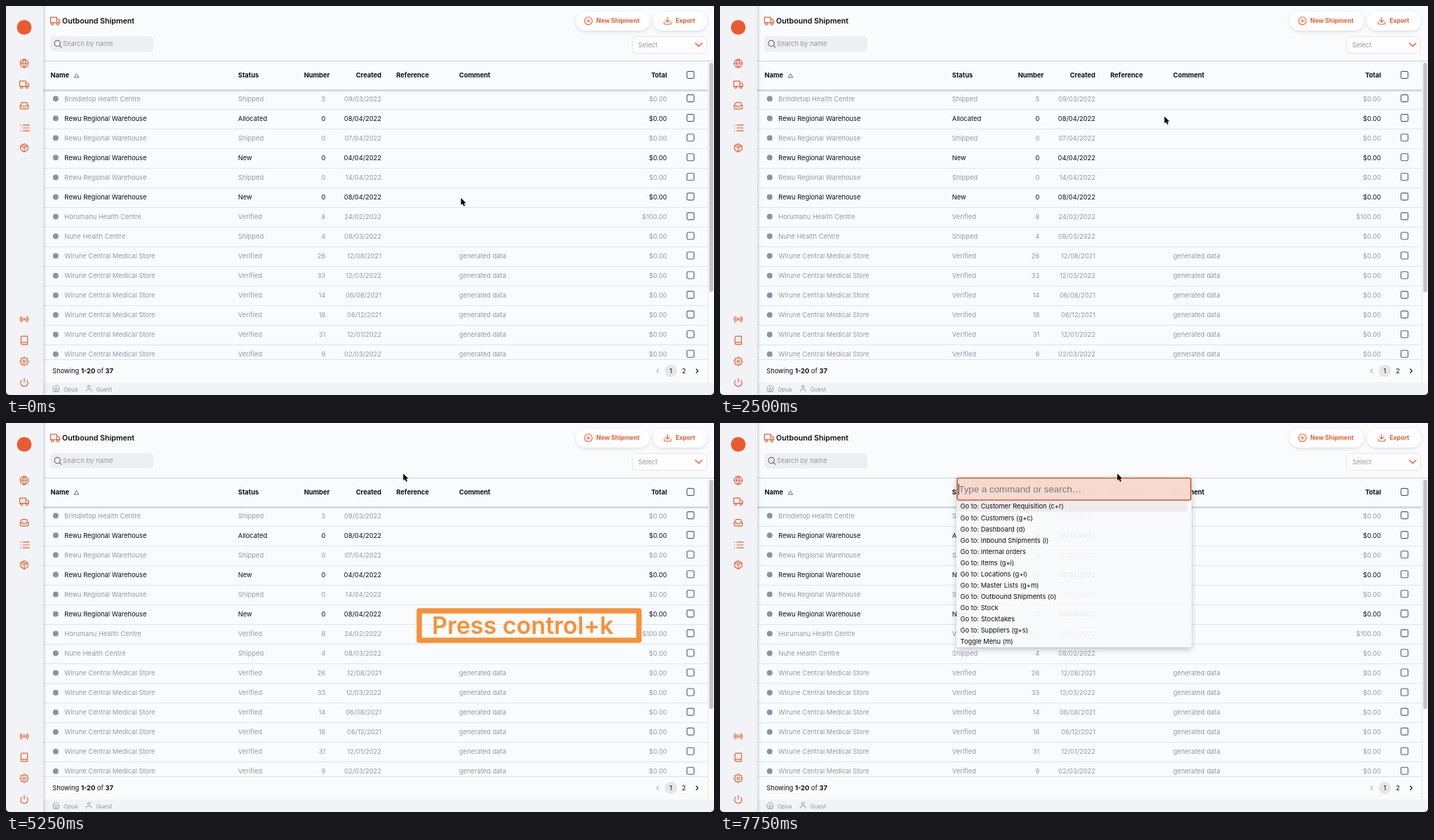
Recreate the animation shown at these times as an HTML page. Size 1009 by 555 pixels, loop 8 s.

```html
<!DOCTYPE html>
<html lang="en">
<head>
<meta charset="utf-8">
<title>Outbound Shipment</title>
<style>
html, body { margin: 0; width: 100%; height: 100%; overflow: hidden; background: #fafbfd; }
svg { display: block; width: 100%; height: 100%; }
text { font-family: Inter, sans-serif; font-size: 9.33px; fill: #0d0d14; white-space: pre; }
.muted { fill: #9696a1; }
.bold { font-weight: 700; }
.title { font-size: 10.67px; font-weight: 600; }
.btn { font-size: 8.67px; font-weight: 700; fill: #e95c30; }
.small { font-size: 8px; fill: #8f90a6; }
.ask { font-family: "Liberation Sans", Arial, sans-serif; font-size: 13.33px; fill: #85736f; }
.note { font-size: 34px; font-weight: 600; fill: #f79138; }
.icon { fill: none; stroke-linecap: round; stroke-linejoin: round; }
</style>
</head>
<body>
<svg id="stage" viewBox="0 0 1009 555" preserveAspectRatio="none">
  <defs>
    <filter id="soft" x="-20%" y="-40%" width="140%" height="200%">
      <feDropShadow dx="0" dy="1.5" stdDeviation="2.2" flood-color="#555770" flood-opacity=".2"/>
    </filter>
    <filter id="deep" x="-10%" y="-10%" width="120%" height="125%">
      <feDropShadow dx="0" dy="3" stdDeviation="4" flood-color="#000" flood-opacity=".25"/>
    </filter>
    <linearGradient id="right"><stop stop-color="#555770" stop-opacity=".2"/><stop offset="1" stop-color="#555770" stop-opacity="0"/></linearGradient>
    <linearGradient id="down" x2="0" y2="1"><stop stop-color="#555770" stop-opacity=".28"/><stop offset="1" stop-color="#555770" stop-opacity="0"/></linearGradient>
    <clipPath id="body"><rect x="53" y="119" width="947" height="385"/></clipPath>
  </defs>
</svg>
<script>
const NS = 'http://www.w3.org/2000/svg';
const stage = document.getElementById('stage');
const ORANGE = '#e95c30', GREY = '#8f90a6';

function add(parent, tag, attrs, content) {
  const el = document.createElementNS(NS, tag);
  for (const key in attrs) el.setAttribute(key, attrs[key]);
  if (content !== undefined) el.textContent = content;
  parent.appendChild(el);
  return el;
}
const group = (parent, attrs = {}) => add(parent, 'g', attrs);
const rect = (parent, x, y, width, height, fill, more) =>
  add(parent, 'rect', { x, y, width, height, fill, ...more });
const line = (parent, d, stroke, width = 1, more) =>
  add(parent, 'path', { d, stroke, 'stroke-width': width, class: 'icon', ...more });

// Text is placed by the middle of its capitals.
function label(parent, str, x, mid, cls = '', anchor = 'start', size = 9.33) {
  return add(parent, 'text', { x, y: mid + size * 0.364, class: cls, 'text-anchor': anchor }, str);
}

const ring = (x, y, r) => `M${x - r} ${y}a${r} ${r} 0 1 0 ${2 * r} 0a${r} ${r} 0 1 0 ${-2 * r} 0`;
function gear() {
  let d = '';
  for (let i = 0; i < 96; i++) {
    const a = i / 96 * 2 * Math.PI, r = 9.1 + 1.4 * Math.cos(8 * a);
    d += (i ? 'L' : 'M') + (12 + r * Math.cos(a)).toFixed(2) + ' ' + (12 + r * Math.sin(a)).toFixed(2);
  }
  return d + 'z';
}

const ICONS = {
  globe: ring(12, 12, 10) + 'M2 12h20M12 2a15.3 15.3 0 0 1 4 10 15.3 15.3 0 0 1-4 10 15.3 15.3 0 0 1-4-10 15.3 15.3 0 0 1 4-10z',
  truck: 'M1 3h15v13H1zM16 8h4l3 3v5h-7z' + ring(5.5, 18.5, 2.5) + ring(18.5, 18.5, 2.5),
  inbox: 'M22 12h-6l-2 3h-4l-2-3H2M5.45 5.1L2 12v6a2 2 0 0 0 2 2h16a2 2 0 0 0 2-2v-6l-3.45-6.9A2 2 0 0 0 16.8 4H7.2a2 2 0 0 0-1.75 1.1z',
  list: 'M7 5h16M7 12h16M7 19h16M1 5h.6M1 12h.6M1 19h.6',
  box: 'M16.5 9.4l-9-5.2M21 16V8a2 2 0 0 0-1-1.7l-7-4a2 2 0 0 0-2 0l-7 4A2 2 0 0 0 3 8v8a2 2 0 0 0 1 1.7l7 4a2 2 0 0 0 2 0l7-4a2 2 0 0 0 1-1.7zM3.3 7L12 12l8.7-5M12 22V12',
  radio: ring(12, 12, 2) + 'M16.2 7.8a6 6 0 0 1 0 8.4M7.8 16.2a6 6 0 0 1 0-8.4M19 5a10 10 0 0 1 0 14M5 19a10 10 0 0 1 0-14',
  book: 'M4 19.5A2.5 2.5 0 0 1 6.5 17H20M6.5 2H20v20H6.5A2.5 2.5 0 0 1 4 19.5v-15A2.5 2.5 0 0 1 6.5 2z',
  gear: ring(12, 12, 3) + gear(),
  power: 'M18.4 6.6a9 9 0 1 1-12.8 0M12 2v10',
  plus: ring(12, 12, 10) + 'M12 8v8M8 12h8',
  down: 'M21 15v4a2 2 0 0 1-2 2H5a2 2 0 0 1-2-2v-4M7 10l5 5 5-5M12 15V3',
  home: 'M3 9l9-7 9 7v11a2 2 0 0 1-2 2H5a2 2 0 0 1-2-2zM9 22V12h6v10',
  user: 'M20 21v-2a4 4 0 0 0-4-4H8a4 4 0 0 0-4 4v2' + ring(12, 7, 4)
};
function icon(name, x, y, scale = 0.6, color = ORANGE) {
  line(stage, ICONS[name], color, 2, {
    transform: `translate(${x - 12 * scale} ${y - 12 * scale}) scale(${scale})`
  });
}

function checkbox(parent, y) {
  rect(parent, 970.5, y - 5, 10, 10, 'none', { rx: 1.6, stroke: '#5b5c69', 'stroke-width': 1.1 });
}

// Backgrounds
rect(stage, 0, 0, 1009, 555, '#fafbfd');
rect(stage, 53, 79, 947, 425, '#f8fcfe');
rect(stage, 53, 537, 956, 18, '#f2f3f6');
rect(stage, 53, 78, 956, 1, '#cfd1d5');

// Table rows
const rows = [
  ['Brindletop Health Centre', 'Shipped', 5, '09/03/2022'],
  ['Rewu Regional Warehouse', 'Allocated', 0, '08/04/2022'],
  ['Rewu Regional Warehouse', 'Shipped', 0, '07/04/2022'],
  ['Rewu Regional Warehouse', 'New', 0, '04/04/2022'],
  ['Rewu Regional Warehouse', 'Shipped', 0, '14/04/2022'],
  ['Rewu Regional Warehouse', 'New', 0, '08/04/2022'],
  ['Horumanu Health Centre', 'Verified', 8, '24/02/2022'],
  ['Nuhe Health Centre', 'Shipped', 4, '08/03/2022']
];
[[26, '12/08/2021'], [33, '12/03/2022'], [14, '06/08/2021'], [18, '06/12/2021'], [31, '12/01/2022'], [9, '02/03/2022']]
  .forEach(([n, date]) => rows.push(['Wirune Central Medical Store', 'Verified', n, date, 'generated data']));

const table = group(stage, { 'clip-path': 'url(#body)' });
const hover = rect(table, 53, 259.5, 947, 28, '#f0f1f4');
rows.forEach(([name, status, number, date, comment], i) => {
  const y = 132.2 + i * 28.05;
  const cls = status === 'New' || status === 'Allocated' ? '' : 'muted';
  add(table, 'circle', { cx: 70.8, cy: y, r: 4, fill: GREY });
  label(table, name, 83.3, y, cls);
  label(table, status, 330.8, y, cls);
  label(table, number, 455.3, y, cls, 'end');
  label(table, date, 535, y, cls, 'end');
  if (comment) label(table, comment, 645.8, y, cls);
  label(table, i === 6 ? '$100.00' : '$0.00', 942, y, cls, 'end');
  checkbox(table, y - 0.6);
  rect(table, 53, Math.round(y + 14.6), 947, 1, '#e0e4e8');
});

// Table header
rect(stage, 53, 119, 947, 1, '#d5d8dc');
rect(stage, 53, 120, 947, 3, 'url(#down)');
[['Name', 63.5], ['Status', 330.8], ['Number', 461.3, 'end'], ['Created', 535, 'end'],
 ['Reference', 556.3], ['Comment', 645.8], ['Total', 942, 'end']]
  .forEach(([str, x, anchor]) => label(stage, str, x, 99, 'bold', anchor));
line(stage, 'M97.3 101.6L100.4 96.6L103.5 101.6z', '#555770', 0.9);
checkbox(stage, 98.4);

// Scrollbar
rect(stage, 1000, 79, 9, 458, '#fafafb');
rect(stage, 1000, 79, 1, 458, '#e6e7ea');
rect(stage, 1002.3, 81, 5.6, 327, '#c2c3c6', { rx: 2.8 });

// Toolbar
icon('truck', 70, 21.5);
label(stage, 'Outbound Shipment', 80, 21.2, 'title', 'start', 10.67);
rect(stage, 63, 43, 147, 22, '#eeeff3', { rx: 5 });
line(stage, ring(73.2, 53.3, 4.2) + 'M76.3 56.4L79 59.2', '#686a7c', 1.2);
label(stage, 'Search by name', 81, 53.3, 'muted');
rect(stage, 812, 8, 105, 27, '#fff', { rx: 13.5, filter: 'url(#soft)' });
icon('plus', 830, 21.2, 0.54);
label(stage, 'New Shipment', 841.3, 21.3, 'btn', 'start', 8.67);
rect(stage, 922, 8, 77, 27, '#fff', { rx: 13.5, filter: 'url(#soft)' });
icon('down', 942.8, 21.2, 0.54);
label(stage, 'Export', 954.2, 21.3, 'btn', 'start', 8.67);
rect(stage, 892.5, 43.5, 106, 24, '#fdfdfe', { rx: 5, stroke: '#e2e4ea' });
label(stage, 'Select', 901, 55.6, 'muted');
line(stage, 'M982.5 53l4.7 4.5 4.7-4.5', ORANGE, 1.4);

// Pagination
rect(stage, 53, 504, 947, 1, '#dfe2e6');
const shown = label(stage, 'Showing ', 66.2, 520.5);
add(shown, 'tspan', { class: 'bold' }, '1-20');
add(shown, 'tspan', {}, ' of ');
add(shown, 'tspan', { class: 'bold' }, '37');
add(stage, 'circle', { cx: 947.5, cy: 520.5, r: 8.8, fill: '#e6e6e9' });
line(stage, 'M930 518l-2.5 2.6 2.5 2.6', '#a9aab5', 1.1);
line(stage, 'M983.8 518l2.5 2.6-2.5 2.6', '#1c1c28', 1.3);
label(stage, '1', 947.5, 520.6, '', 'middle');
label(stage, '2', 966, 520.6, '', 'middle');

// Bottom bar
icon('home', 71.5, 545.5, 0.46, GREY);
label(stage, 'Opua', 82, 546.8, 'small', 'start', 8);
icon('user', 118.3, 545.3, 0.46, GREY);
label(stage, 'Guest', 128.8, 546.8, 'small', 'start', 8);

// Side menu
rect(stage, 53, 0, 5, 555, 'url(#right)');
rect(stage, 0, 0, 53, 555, '#f2f3f6');
add(stage, 'circle', { cx: 26, cy: 30.5, r: 10.5, fill: ORANGE });
[['globe', 82], ['truck', 112.3], ['inbox', 142.3], ['list', 174], ['box', 202.3],
 ['radio', 447], ['book', 477], ['gear', 507], ['power', 537]]
  .forEach(([name, y]) => icon(name, name === 'list' ? 27 : 26, y, 0.58));

// Window corners
add(stage, 'path', { d: 'M0 550a5 5 0 0 0 5 5H0zM1009 550a5 5 0 0 1-5 5h5z', fill: '#15151a' });

// Key hint
const hint = group(stage);
rect(hint, 589, 268, 313, 42, 'none', { stroke: '#f79138', 'stroke-width': 7.6, 'stroke-linejoin': 'round' });
label(hint, 'Press control+k', 607, 288.8, 'note', 'start', 34);

// Command palette
const palette = group(stage);
rect(palette, 337, 77.5, 335, 242.5, '#fafafb', { rx: 3, opacity: 0.93, filter: 'url(#deep)' });
rect(palette, 338, 78.5, 333, 31.5, '#f6d6ca', { rx: 2, 'fill-opacity': 0.86, stroke: '#d4572f', 'stroke-width': 1.6 });
rect(palette, 337, 111, 329, 15.6, '#ececee', { opacity: 0.95 });
label(palette, 'Type a command or search…', 340.3, 94.5, 'ask', 'start', 13.33);
const caret = rect(palette, 339.6, 86.5, 1, 16, '#1c1c28');
['Customer Requisition (c+r)', 'Customers (g+c)', 'Dashboard (d)', 'Inbound Shipments (i)',
 'Internal orders', 'Items (g+i)', 'Locations (g+l)', 'Master Lists (g+m)',
 'Outbound Shipments (o)', 'Stock', 'Stocktakes', 'Suppliers (g+s)', 'Toggle Menu (m)']
  .forEach((str, i, all) =>
    label(palette, (i < all.length - 1 ? 'Go to: ' : '') + str, 342.6, 119.1 + i * 16.04));

// Pointer
const pointer = add(stage, 'path', {
  d: 'M0 0v10l2.3-2.1 1.6 3.7 1.8-.8-1.6-3.6h3.2z',
  fill: '#000', stroke: '#fff', 'stroke-width': 0.8, 'paint-order': 'stroke'
});
const stops = [[0, 648.4, 274], [2500, 633.4, 157.5], [2750, 599.4, 144.5], [3000, 582.4, 181.5], [5000, 566.2, 72.2]];

const LOOP = 8000;
const show = (el, on) => el.setAttribute('visibility', on ? 'visible' : 'hidden');

function draw(t) {
  const [, x, y] = stops.filter(s => s[0] <= t).pop();
  pointer.setAttribute('transform', `translate(${x} ${y})`);
  show(hover, t >= 500 && t < 2500);
  show(hint, t >= 5250 && t < 6250);
  show(palette, t >= 7500);
  caret.setAttribute('opacity', t < 7750 ? 0.6 : 1);
}

const start = performance.now();
function tick() {
  draw((performance.now() - start) % LOOP);
  requestAnimationFrame(tick);
}
tick();
</script>
</body>
</html>
```
